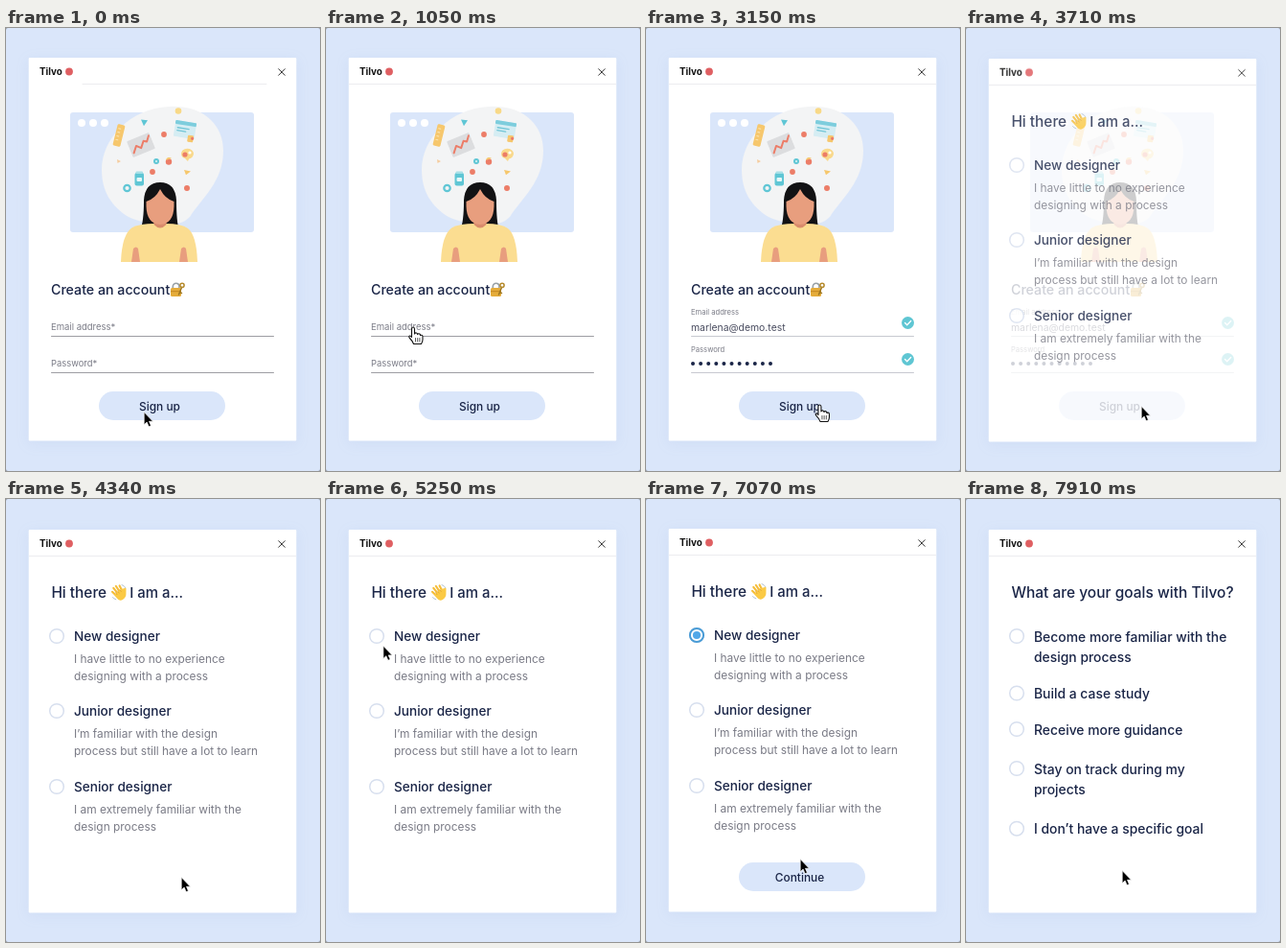
These frames come from a looping animation (328x462 px, 8 s). An HTML page:

```html
<!DOCTYPE html>
<html lang="en">
<head>
<meta charset="utf-8">
<title>Sign-up flow</title>
<style>
html, body { margin: 0; width: 100%; height: 100%; overflow: hidden; background: #8b919c; }
svg { display: block; width: 100%; height: 100%; background: #dae6fa; border-radius: 2px; font-family: Inter, Roboto, sans-serif; }
#card { filter: drop-shadow(0 3px 7px rgba(110, 145, 205, .09)); }
</style>
</head>
<body>
<svg id="stage" viewBox="0 0 328 462"></svg>
<script>
const NAVY = '#1a2547', GREY = '#7a7b86', SKY = '#dae6fa', CYAN = '#5fc6d5', RED = '#ec7d68', GOLD = '#f6c76d';

const text = (x, y, s, size = 13.6, fill = NAVY, weight = 500, anchor = 'start') =>
  `<text x="${x}" y="${y}" font-size="${size}" fill="${fill}" font-weight="${weight}" text-anchor="${anchor}">${s}</text>`;
const rect = (x, y, w, h, fill, r = 0) =>
  `<rect x="${x}" y="${y}" width="${w}" height="${h}" rx="${r}" fill="${fill}"/>`;
const dot = (x, y, r, fill, extra = '') => `<circle cx="${x}" cy="${y}" r="${r}" fill="${fill}" ${extra}/>`;
const path = (d, fill, extra = '') => `<path d="${d}" fill="${fill}" ${extra}/>`;
const line = (d, color, w = 1) => path(d, 'none', `stroke="${color}" stroke-width="${w}" stroke-linecap="round" stroke-linejoin="round"`);
const group = (transform, s) => `<g transform="${transform}">${s}</g>`;

const header = text(35, 49, 'Tilvo', 9.8, '#111', 700) + dot(66, 45.5, 3.9, '#df5f62') +
  line('M284.7 42.7l6.6 6.6m0-6.6l-6.6 6.6', '#444', 1);
const button = s => rect(97, 379, 132, 30, SKY, 15) + text(160.5, 398.5, s, 11.9, NAVY, 500, 'middle');

const lock = line('M174.3 272v-2.4a3.3 3.3 0 0 1 6.6 0v2.4', '#98a0a5', 1.6) +
  rect(172, 271, 11, 9, '#e5ac3a', 1.5) + rect(172, 274, 11, 1.2, '#c98d25') +
  line('M183.5 270.5l-3 7.5m1 -2.4l2 .8', '#9b7521', 1.5) +
  dot(184, 268.3, 2.1, 'none', 'stroke="#b58a2c" stroke-width="1.5"');

const wave = group('translate(118.3 97) rotate(-36) scale(-1.1 1.1)',
  line('M-3.4 0L-4.3-5.4M-1 0L-1.3-7.2M1.4 0L1.7-7M3.7 1L4.7-4.8', '#f5bd38', 1.9) +
  path('M-4.400-1.500H4.800V2.500Q4.800 7 .3 7Q-3.300 7-4.800 4.400L-7.800.4Q-8-1.200-6.200-.8Z', '#fbca45') +
  line('M-2.300 0v-2.400M.2 0v-2.400M2.600 0v-2.400', '#d99528', .5)) +
  line('M121 88.500q2.600.6 3.700 3M111.500 101.500q1.200 1.800 3.300 2.300', '#9fb3c6', .8);

const art = rect(67, 88, 192, 125, SKY, 3) +
  [79, 91, 103].map(x => dot(x, 99, 4, '#fff')).join('') +
  path('M100 148C100 115 130 84 170 82C206 80 227 101 227 128C227 160 205 177 192 197C180 210 150 207 128 197C110 186 100 170 100 148Z', '#f3f4f5') +
  dot(180, 86.5, 3.3, '#f8d987') +
  group('translate(118 112) rotate(14)', rect(-4, -11.5, 8, 23, GOLD, 1.5) + line('M-2-7h2M-2-3h2M-2 1h2M-2 5h2', '#fbe6b6')) +
  path('M141 95.5l7 .7l-4 6z', CYAN) +
  group('translate(141 122) rotate(-22)', rect(-12.5, -9, 25, 18, '#dcdddf', 1) + line('M-10 5l5-6l4 4l5-6l3 2l4-5', RED, 2)) +
  dot(165, 111, 2.9, RED) +
  group('translate(187 106) rotate(9)', rect(-11, -8.5, 22, 17, '#d5edf3', 1) + rect(-11, -8.5, 22, 4, '#7dcddd', 1) +
    line('M-8-1H4M-8 2H1', '#72c6d7', 1.3) + rect(4, 5, 6, 7, GOLD, 1) + dot(9, 8, 1.6, RED)) +
  path('M183 131a6.5 5.5 0 1 1 8 5.5l-1 2.5l-3-3q-4-1-4-5z', '#f9d98c') + dot(187, 132, 2.6, RED) + dot(192, 130, 1.6, '#fff') +
  dot(170, 139.5, 3.2, RED) + path('M167 138a3.5 3.5 0 0 1 6-2z', GOLD) +
  dot(157, 139, 3, CYAN) + dot(157, 139, 1, '#dff4f6') +
  path('M116 137l4 2l-3.5 2z', '#f5cda0') + path('M186 148l7 1.5l-5 3.7z', GOLD) +
  rect(134.5, 151, 9.5, 13.5, CYAN, 2) + rect(135.5, 149.5, 7.5, 2.5, '#a6dfe7', 1) + rect(136.5, 156, 5.5, 4, '#e6f7f8', 1) +
  dot(126.5, 167, 3.2, 'none', `stroke="${CYAN}" stroke-width="2.2"`) +
  dot(153, 150, 2.9, RED) + dot(189, 167, 3, RED) +
  path('M140 211Q144 203 144 180Q145 161 161 161Q177 161 178 180Q178 203 181 211Z', '#121214') +
  path('M120 244Q121 215 132 208Q140 204 155 204H167Q183 204 190 209Q199 216 200 244Z', '#fbdd91') +
  path('M154.5 197h13v8q-6.5 7-13 0z', '#d98b6c') +
  path('M146.5 181Q156 178 161 168Q166 178 175.5 181V186Q175 204 161 205Q147 204 146.5 186Z', '#e89e7e') +
  path('M131 244l2-14q3-3 5 0l2 14zM181 244l2-14q3-3 5 0l2 14z', '#e89e7e');

const rule = (y, color) => line(`M47.5 ${y}H279.5`, color, .8);
const check = y => dot(273.5, y, 6.5, '#5fc6d3') + line(`M270.5 ${y}l2.2 2.2l4-4.2`, '#fff', 1.3);
const account = art + text(47, 278, 'Create an account', 14.2) + lock + button('Sign up');
const emptyForm = account +
  text(47, 315, 'Email address*', 9.5, GREY, 400) + rule(321.5, '#85858c') +
  text(47, 353, 'Password*', 9.4, GREY, 400) + rule(359.5, '#85858c');
const fullForm = account +
  text(47, 299, 'Email address', 7.6, GREY, 400) + text(47, 316, 'marlena@demo.test', 10.4, '#4a4d60', 400) + rule(321.5, '#b9bcc4') +
  text(47, 338, 'Password', 7.6, GREY, 400) + rule(359.5, '#b9bcc4') +
  Array.from({ length: 11 }, (_, i) => dot(49 + i * 8.1, 350, 2, NAVY)).join('') +
  check(307.5) + check(345.5);

const radio = y => dot(53, y, 7.3, '#fff', 'stroke="#d7dfee" stroke-width="1.5"');
const role = (y, name, a, b) => radio(y) + text(71, y + 5, name) +
  text(71, y + 28, a, 11.9, GREY, 400) + text(71, y + 46, b, 11.9, GREY, 400);
const roles = text(47.4, 102, 'Hi there', 15.4) + wave + text(129.3, 102, 'I am a...', 14.9) +
  role(142, 'New designer', 'I have little to no experience', 'designing with a process') +
  role(220, 'Junior designer', 'I’m familiar with the design', 'process but still have a lot to learn') +
  role(299, 'Senior designer', 'I am extremely familiar with the', 'design process');
const chosen = roles + dot(53, 142, 7.1, '#fff', 'stroke="#4a9cd6" stroke-width="2"') +
  dot(53, 142, 4.1, '#52a8e8') + button('Continue');

const goal = (y, a, b) => radio(y) + text(71, y + 5.5, a, 13.9) + (b ? text(71, y + 26.5, b, 13.9) : '');
const goals = text(47.4, 102, 'What are your goals with Tilvo?', 15.5) +
  goal(142, 'Become more familiar with the', 'design process') +
  goal(201.5, 'Build a case study') +
  goal(239, 'Receive more guidance') +
  goal(280, 'Stay on track during my', 'projects') +
  goal(342.7, 'I don’t have a specific goal');

const screens = [emptyForm, fullForm, roles, chosen, goals];
const shift = [0, 0, 1, 0, 1];
const arrow = group('translate(.2 1) scale(.9)',
  path('M0-.5V14.2L3.3 11.2L5.5 16.3L8.1 15.2L5.9 10.3H10.4Z', '#000', 'stroke="#fff" stroke-width=".8"'));
const hand = path('M-3 8V1Q-3-1-1.5-1Q0-1 0 1V6Q.5 4.5 2 5Q3 5.3 3 6.5Q4 5.3 5.3 6Q6 6.4 6 7.5Q8.5 6.5 8.5 9V12Q8.5 14 7 16.5H-1Q-2 13.5-5 10.5Q-6.5 8.5-5 8Q-4 7.8-3 9.5Z',
  '#fff', 'stroke="#111" stroke-width="1.1" stroke-linejoin="round"') + line('M1 10.5v3.5M3.2 10.5v3.5M5.4 10.5v3.5', '#111', .7);

const $ = id => document.getElementById(id);
$('stage').innerHTML =
  `<g id="card">${rect(23.7, 31, 279.6, 399.5, '#fff', 1)}${line('M80 58.5H272', '#ececef')}
    <g id="edges">${line('M24.5 58.5H80M272 58.5H302.5', '#ececef')}</g></g>` +
  screens.map((s, i) => `<g id="screen${i}" transform="translate(0 ${shift[i]})">${header + s}</g>`).join('') +
  `<g id="cursor"><g id="arrow">${arrow}</g><g id="hand">${hand}</g></g>`;

const clamp = x => Math.min(1, Math.max(0, x));
const inOut = x => x < .5 ? 4 * x ** 3 : 1 - 4 * (1 - x) ** 3;
const smooth = x => x * x * (3 - 2 * x);

// Dissolves into the next screen: start, end, easing
const fades = [
  [1500, 2170, x => 1 - (1 - x) ** 2],
  [3200, 3920, smooth],
  [5440, 6230, x => x ** 2.2],
  [7240, 7910, smooth]
];
// Cursor trips: start time, from, bend, to
const trips = [
  [160, [144, 400], [118, 356], [92.5, 313]],
  [2290, [92.5, 313], [138, 353], [183, 394]],
  [4530, [183, 394], [119, 269], [55, 143.5]],
  [6370, [55, 143.5], [144, 265], [163, 387]]
];

function draw(now) {
  const t = now % 8000;
  const p = fades.map(([a, b, ease]) => ease(clamp((t - a) / (b - a))));
  screens.forEach((_, i) => {
    const alpha = (i ? p[i - 1] : 1) * (i < 4 ? 1 - p[i] : 1);
    $('screen' + i).style.opacity = alpha;
    $('screen' + i).style.display = alpha ? '' : 'none';
  });
  const top = p.filter(v => v >= .5).length;
  $('card').setAttribute('transform', `translate(0 ${shift[top]})`);
  $('edges').style.opacity = clamp((t - 35) / 385);

  const n = Math.max(0, trips.findLastIndex(trip => t >= trip[0]));
  const [start, a, c, b] = trips[n];
  const u = inOut(clamp((t - start) / 910));
  const [x, y] = [0, 1].map(k => (1 - u) ** 2 * a[k] + 2 * u * (1 - u) * c[k] + u * u * b[k]);
  const over = [y < 322, y > 379, y < 151, y > 379][n];
  const pointing = over && t < fades[n][0] + 20;
  $('cursor').setAttribute('transform', `translate(${x} ${y})`);
  $('arrow').style.display = pointing ? 'none' : '';
  $('hand').style.display = pointing ? '' : 'none';
}

let first;
function tick(now) {
  first ??= now;
  draw(now - first);
  requestAnimationFrame(tick);
}
draw(0);
requestAnimationFrame(tick);
</script>
</body>
</html>
```
